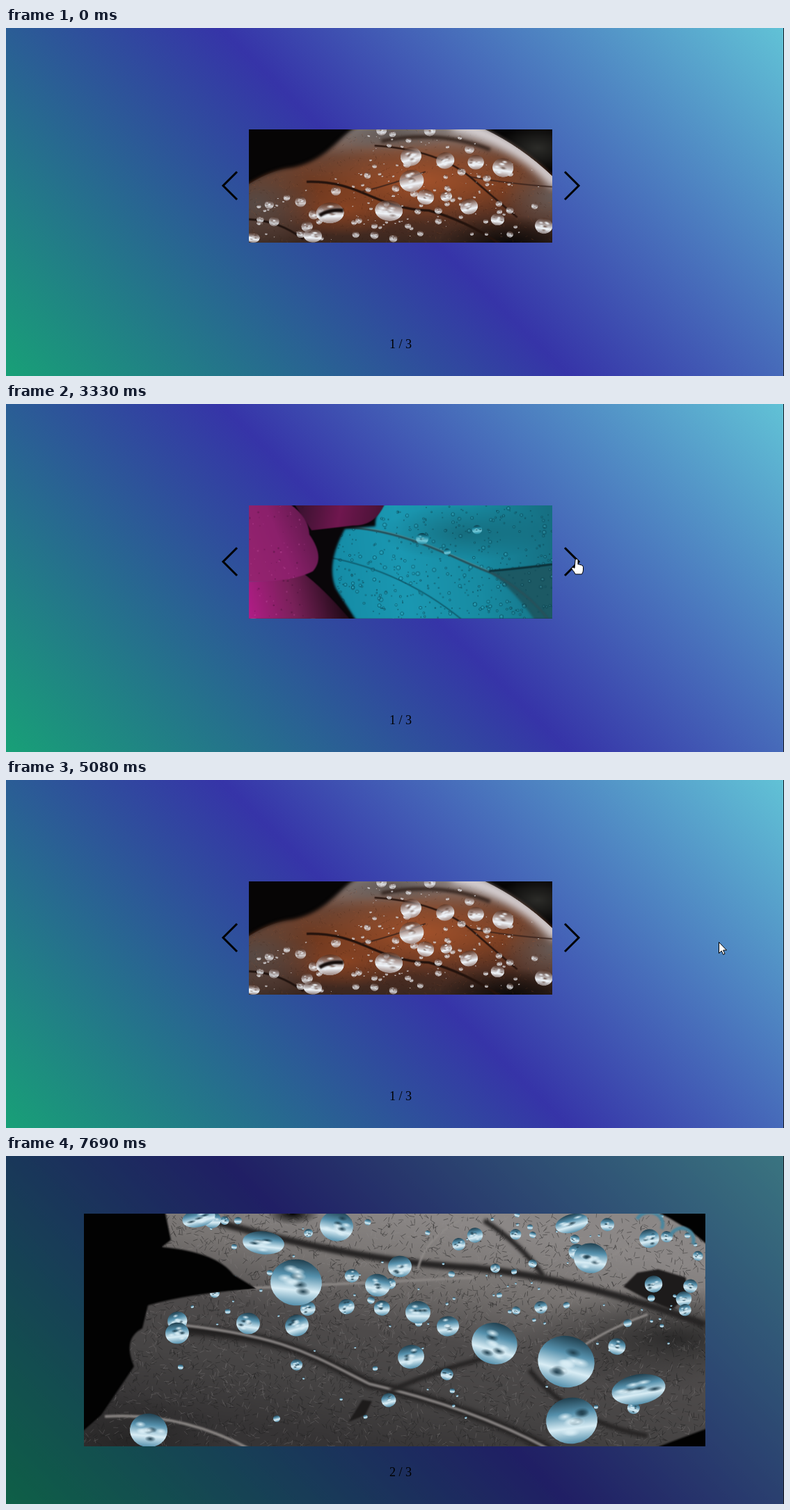
Animation of 1118x501 px, one loop 8350 ms. Source, as an HTML page with a canvas:

```html
<!DOCTYPE html>
<html lang="en">
<head>
<meta charset="utf-8">
<title>Image slider with lightbox</title>
<style>
  html, body { margin: 0; width: 100%; height: 100%; overflow: hidden; }
  .stage {
    position: relative; width: 1118px; height: 501px; overflow: hidden;
    background: linear-gradient(45deg, #18a077, #3634a8 50%, #61c2d6);
  }
  .stage > *, canvas { position: absolute; }
  .slider { left: 349px; top: 146px; width: 436px; height: 163px; }
  .slider canvas { width: 100%; height: 100%; }
  .arrows { left: 0; top: 0; fill: none; stroke: #000; stroke-width: 3; }
  .counter {
    left: 517px; top: 445px; width: 100px; height: 21px; overflow: hidden;
    font: 18px/21px "Liberation Serif", serif; text-align: center; color: #000;
  }
  .lightbox { inset: 0; background: rgba(0, 0, 0, .4); }
  .lightbox canvas { left: 112px; top: 83px; }
  .cursor { left: 0; top: 0; overflow: visible; fill: #fff; stroke: #000; }
  .edge { right: 0; top: 0; width: 1px; height: 100%; background: #16181f; }

  .second, .third, .lightbox, .open-second, .counter div, .cursor, .arrow, .hand {
    animation: 8350ms ease infinite;
  }
  .second { animation-name: second; }
  .third { animation-name: third; }
  .counter div { animation-name: count; }
  .cursor { animation-name: move; animation-timing-function: ease-in-out; }
  .lightbox, .open-second, .counter div, .arrow, .hand { animation-timing-function: step-end; }
  .lightbox { animation-name: lightbox; }
  .open-second { animation-name: open-second; }
  .arrow { animation-name: arrow; }
  .hand { animation-name: hand; }

  @keyframes second {
    0%, 21.557%, 35.93%, 82.635% { opacity: 0; }
    26.946%, 35.928%, 88.383%, 100% { opacity: 1; }
  }
  @keyframes third {
    0%, 30.18%, 45.509%, 100% { opacity: 0; }
    35.928%, 40.48% { opacity: 1; }
  }
  @keyframes count {
    0%, 39.88% { transform: none; }
    21.557%, 82.635%, 100% { transform: translateY(-21px); }
    30.18% { transform: translateY(-42px); }
  }
  @keyframes lightbox {
    0%, 60.838% { opacity: 0; }
    48.383%, 86.467%, 100% { opacity: 1; }
  }
  @keyframes open-second {
    0% { opacity: 0; }
    82.635%, 100% { opacity: 1; }
  }
  @keyframes arrow {
    0%, 21.557%, 79.042%, 92.096%, 100% { opacity: 0; }
    1.078%, 40.838%, 83.5% { opacity: 1; }
  }
  @keyframes hand {
    0%, 40.838%, 83.5%, 100% { opacity: 0; }
    21.557%, 79.042% { opacity: 1; }
  }
  @keyframes move {
    0%, 4.072% { transform: translate(1032px, 242px); }
    12.695%, 21.557% { transform: translate(821px, 223px); }
    21.56%, 40.48% { transform: translate(820px, 223px); }
    45.509%, 50.299% { transform: translate(701px, 226px); }
    58.922%, 61.796% { transform: translate(1024px, 233px); }
    70.06% { transform: translate(824px, 233px); }
    75.449% { transform: translate(727px, 212px); }
    80.479%, 82.635% { transform: translate(812px, 219px); }
    86.467%, 88.383% { transform: translate(740px, 230px); }
    92.096%, 100% { transform: translate(1040px, 204px); }
  }
</style>
</head>
<body>
<div class="stage">
  <div class="slider">
    <canvas data-photo="brown"></canvas>
    <canvas data-photo="grey" class="second"></canvas>
    <canvas data-photo="teal" class="third"></canvas>
  </div>
  <svg class="arrows" width="1118" height="501"><path d="M332 207L312 227L332 247M803 207L823 227L803 247"/></svg>
  <div class="counter"><div>1 / 3<br>2 / 3<br>3 / 3</div></div>
  <div class="lightbox">
    <canvas data-photo="brown"></canvas>
    <canvas data-photo="grey" class="open-second"></canvas>
  </div>
  <svg class="cursor" width="20" height="24">
    <path class="arrow" d="M.5 .5V16.500L4.200 13L6.700 18.300L9 17.200L6.600 12H11.500Z"/>
    <path class="hand" d="M-2 2a2 2 0 0 1 4 0V8q2-1 3 .7q2-.8 3 1q1.500 0 1.500 2V16q0 3-2 6H-2q-1-3-4-6q-2-3-.5-3.700q2-.6 3.500 1Z"/>
  </svg>
  <div class="edge"></div>
</div>
<script>
const W = 893, H = 335;

function seeded(seed) {
  return () => (seed = (seed * 16807) % 2147483647) / 2147483647;
}

function linear(c, x0, y0, x1, y1, ...colors) {
  const g = c.createLinearGradient(x0, y0, x1, y1);
  colors.forEach((color, i) => g.addColorStop(i / (colors.length - 1), color));
  return g;
}

function glow(c, x, y, rx, ry, color) {
  c.save();
  c.translate(x, y);
  c.scale(rx, ry);
  const g = c.createRadialGradient(0, 0, 0, 0, 0, 1);
  g.addColorStop(0, color);
  g.addColorStop(1, color.slice(0, 7) + '00');
  c.fillStyle = g;
  c.fillRect(-1, -1, 2, 2);
  c.restore();
}

function fill(c, path, color, blur) {
  c.filter = `blur(${blur}px)`;
  c.fillStyle = color;
  c.fill(new Path2D(path));
  c.filter = 'none';
}

function stroke(c, path, color, width, blur = 1) {
  c.filter = `blur(${blur}px)`;
  c.strokeStyle = color;
  c.lineWidth = width;
  c.stroke(new Path2D(path));
  c.filter = 'none';
}

// Water drop: dark or clear on top, bright below, with a few random glints.
function drop(c, random, x, y, r, { rim, mid, light }, squash = .9) {
  c.save();
  c.translate(x, y);
  c.rotate(random() * .6 - .3);
  c.scale(r, r * squash);
  c.filter = 'blur(.7px)';
  c.fillStyle = linear(c, 0, -1, 0, 1, rim, mid, light, mid);
  c.beginPath();
  c.arc(0, 0, 1, 0, 7);
  c.fill();
  c.filter = 'none';
  for (let i = 0; i < 9 && r > 6; i++) {
    const a = random() * 6.3, d = random() * .65;
    glow(c, Math.cos(a) * d, Math.sin(a) * d, .3, .18, i % 3 ? light : rim);
  }
  c.restore();
}

// Many small drops, mostly tiny, at places picked by a rule.
function scatter(c, random, count, maxSize, water, place) {
  for (let i = 0; i < count; i++) {
    const [x, y] = place(random(), random());
    drop(c, random, x, y, 1.5 + random() ** 3 * maxSize, water, .95);
  }
}

function grain(c, random, count, colors) {
  c.lineWidth = 1;
  for (let i = 0; i < count; i++) {
    const x = random() * W, y = random() * H, a = random() * 6.3;
    c.strokeStyle = colors[i % colors.length];
    c.beginPath();
    c.moveTo(x, y);
    c.lineTo(x + Math.cos(a) * 7, y + Math.sin(a) * 7);
    c.stroke();
  }
}

const photos = {
  brown(c, random) {
    const water = { rim: '#4a2a1c88', mid: '#b3a8a8bb', light: '#f0f5fa' };
    const leaf = 'M-20 175Q60 120 130 113C250 85 270 0 350-20H650Q800 40 920 165V360H-20Z';
    c.fillStyle = '#060505';
    c.fillRect(0, 0, W, H);
    glow(c, 850, 55, 120, 70, '#2c2c29');
    fill(c, leaf, linear(c, 0, 0, 0, H, '#8b8280', '#6b4534', '#70391f', '#553022', '#3a2720'), 6);
    c.save();
    c.clip(new Path2D(leaf));
    glow(c, 520, 150, 330, 130, '#a0512b');
    glow(c, 280, 235, 200, 80, '#8a4423');
    glow(c, 20, 220, 190, 150, '#574a45');
    glow(c, 893, 200, 150, 110, '#665a56');
    glow(c, 770, 335, 210, 80, '#0c0908');
    glow(c, 420, 15, 180, 50, '#605855');
    grain(c, random, 1300, ['#2a120855', '#a95e3444']);
    stroke(c, 'M600-15Q790 30 910 165', '#d8d2d4', 38, 12);
    stroke(c, 'M170 155C330 150 370 235 530 240Q640 270 740 340', '#24130d', 7);
    stroke(c, 'M370 48Q560 60 660 148T790 260', '#2a160f', 5);
    stroke(c, 'M390 35Q560 0 710 60', '#30211b', 10, 4);
    stroke(c, 'M0 266Q90 270 160 325', '#20130f', 6);
    stroke(c, 'M650 140Q760 160 893 170M330 185Q430 160 520 125', '#35201a', 3);
    c.globalAlpha = .8;
    scatter(c, random, 110, 11, water, (u, v) => [300 + u * 560, 100 + v * 220]);
    c.filter = 'blur(2px)';
    scatter(c, random, 55, 16, water, (u, v) => [u * 470, 330 - u * 250 * v - 90 * v]);
    scatter(c, random, 16, 16, water, (u, v) => [330 + u * 340, v * 60]);
    c.globalAlpha = 1;
    const big = [[477, 80, 31], [479, 152, 36], [578, 92, 27], [668, 97, 24], [748, 113, 31],
      [520, 200, 25], [648, 228, 26], [732, 266, 20], [868, 285, 26], [581, 198, 17]];
    for (const [x, y, r] of big) drop(c, random, x, y, r, water);
    for (const [x, y, r] of [[239, 247, 41], [412, 240, 41], [188, 314, 27], [12, 320, 20]])
      drop(c, random, x, y, r, water, .75);
    stroke(c, 'M208 255Q235 236 278 240', '#130c0a', 11, 2);
    c.restore();
  },

  grey(c, random) {
    const water = { rim: '#203f4e', mid: '#5590ac', light: '#d9edf5' };
    const leaf = `M113-20L125 38L112 48Q190 55 215 88L248 108Q150 115 92 132L84 165
      Q55 180 72 220L25 290L-20 330V360H760L920 300V70Q870 10 780-20Z`;
    c.fillStyle = '#020202';
    c.fillRect(0, 0, W, H);
    fill(c, leaf, linear(c, 460, 0, 400, H, '#8b8786', '#777371', '#4e4b4b', '#464444', '#363435'), 1);
    c.save();
    c.clip(new Path2D(leaf));
    glow(c, 850, 180, 230, 75, '#2b2a2a');
    glow(c, 60, 330, 150, 70, '#272626');
    glow(c, 300, 0, 38, 16, '#000000');
    grain(c, random, 6000, ['#1d1c1c77', '#98949344', '#22212166']);
    const main = 'C290 175 330 205 410 245Q560 280 670 340';
    stroke(c, 'M120 165' + main, '#222020', 14, 3);
    stroke(c, 'M120 158' + main, '#858180', 4);
    stroke(c, 'M190 12Q400 70 560 78Q720 95 893 160', '#262424', 10, 2);
    stroke(c, 'M180 110Q400 100 560 92M30 292Q140 285 240 340', '#888482', 4);
    stroke(c, 'M480 80Q490 30 560 0M720 90Q760 50 840 25M690 210Q740 170 810 145', '#8e8a88', 3);
    stroke(c, 'M575 10Q630 45 660 90M440 255Q520 220 590 205M640 225Q700 300 810 320', '#262424', 7, 2);
    fill(c, 'M775 105L795 85L825 80L865 92L866 120L845 138L812 125ZM380 300L400 268L414 270L404 290Z', '#1d1b1b', 1);
    scatter(c, random, 100, 14, water, (u, v) => [130 + u * 760, v * 160]);
    scatter(c, random, 40, 11, water, (u, v) => [130 + u * 760, 130 + v * 170]);
    const big = [[305, 99, 37], [590, 187, 33], [693, 213, 41], [701, 298, 37], [454, 76, 17],
      [422, 103, 18], [480, 142, 18], [470, 206, 19], [523, 162, 16], [306, 161, 17],
      [236, 158, 17], [134, 172, 17], [363, 18, 24], [728, 64, 24], [93, 312, 27]];
    for (const [x, y, r] of big) drop(c, random, x, y, r, water);
    for (const [x, y, r] of [[797, 253, 39], [258, 42, 30], [701, 14, 24], [165, 6, 24]])
      drop(c, random, x, y, r, water, .55);
    c.restore();
    stroke(c, 'M795 8A16 14 0 0 1 830 22M843 32A16 16 0 0 1 875 44', '#4a879f', 5);
  },

  teal(c, random) {
    const water = { rim: '#0a3743', mid: '#1d8aa2', light: '#76cad9' };
    c.scale(W / 436, H / 163.5);
    c.fillStyle = linear(c, 110, 80, 436, 40, '#158ba5', '#1b98b2', '#188ba2', '#166f82');
    c.fillRect(0, 0, 436, 164);
    fill(c, 'M345 95Q390 92 450 84V180H420Q390 130 345 95Z', '#1c5964', 3);
    glow(c, 310, 40, 120, 40, '#15535f88');
    for (let i = 0; i < 430; i++) {
      const x = 125 + random() * 311, y = random() * 164, r = .5 + random() ** 3 * 2.5;
      c.strokeStyle = '#0b4351bb';
      c.lineWidth = .7;
      c.beginPath();
      c.arc(x, y, r, 0, 7);
      c.stroke();
      c.fillStyle = '#58bed077';
      c.fillRect(x - r / 2, y - r / 2, r * .7, r * .7);
    }
    stroke(c, 'M135 31C230 35 300 80 350 98Q400 125 430 164', '#26525c', 3.5);
    stroke(c, 'M140 30C230 34 300 78 350 96', '#4d97a2', 1);
    stroke(c, 'M115 75Q220 95 305 164', '#0e5667', 1.6);
    stroke(c, 'M345 95Q390 91 436 85', '#0c3038', 3);
    fill(c, 'M60-10H202Q180 10 182 30L138 34Q110 85 125 120L160 175H60Z', '#090609', 3);
    fill(c, 'M60-10H198Q185 30 150 29L90 36Z', linear(c, 70, 0, 190, 25, '#39122f', '#70174f', '#481335'), 1);
    fill(c, 'M-10 110Q50 110 78 98Q108 120 150 170H-10Z', linear(c, 0, 164, 130, 130, '#b31d88', '#782159', '#240b1a'), 1);
    fill(c, 'M-10-10H45Q85 10 87 42Q110 75 92 95Q60 112-10 110Z', linear(c, 0, 80, 98, 40, '#94236f', '#8b206b', '#5f194a'), 1);
    for (let i = 0; i < 90; i++) {
      c.fillStyle = i % 2 ? '#d25cae55' : '#33102955';
      c.beginPath();
      c.arc(random() * 80, random() * 160, .4 + random(), 0, 7);
      c.fill();
    }
    for (const [x, y, r] of [[249, 48, 9], [328, 35, 7], [285, 67, 5]]) drop(c, random, x, y, r, water);
  }
};

document.querySelectorAll('canvas').forEach(canvas => {
  canvas.width = W;
  canvas.height = H;
  photos[canvas.dataset.photo](canvas.getContext('2d'), seeded(4217));
});
</script>
</body>
</html>
```
